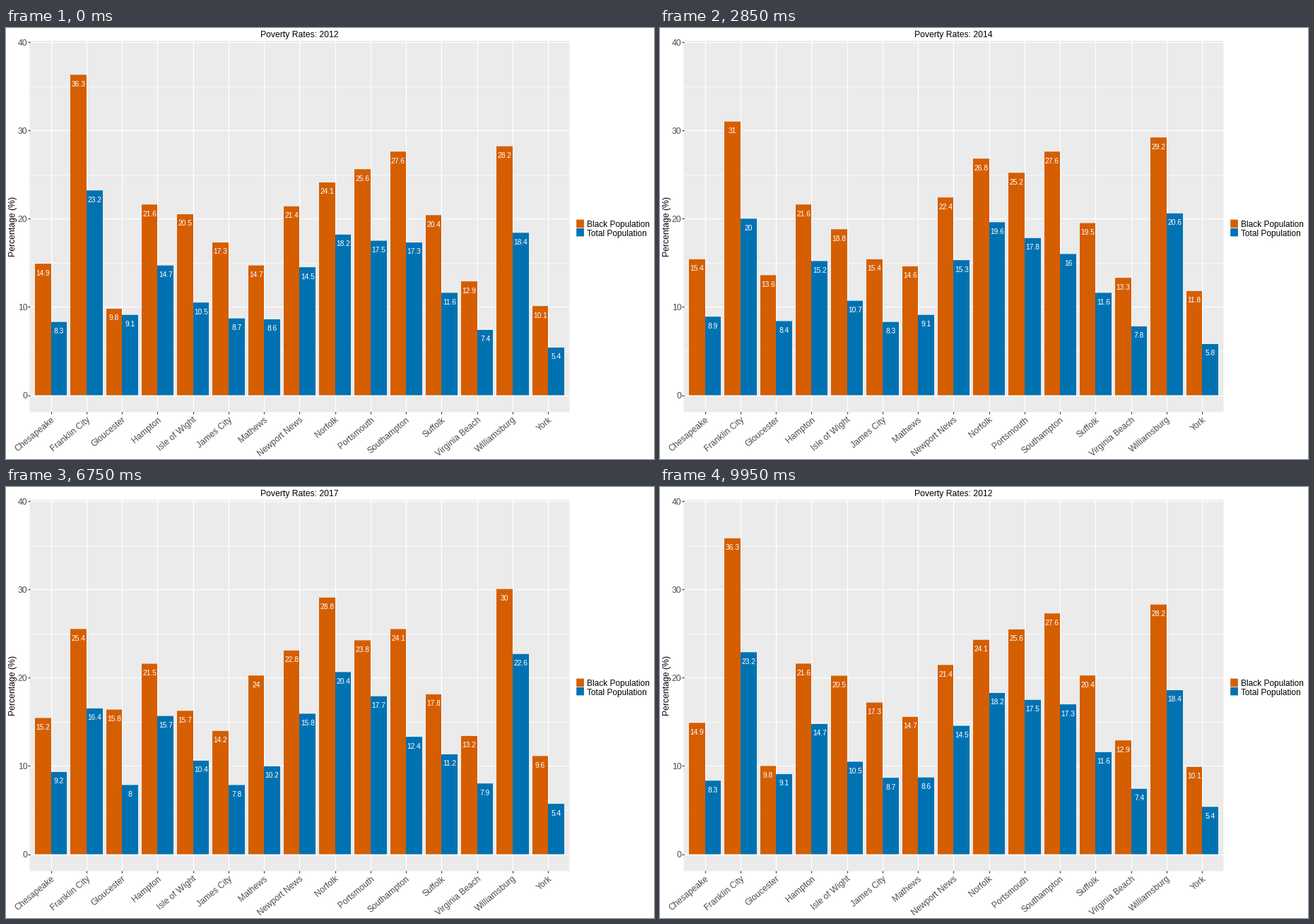
These frames come from a looping animation (917x611 px, 10 s). A matplotlib script:

```python
import numpy as np
import matplotlib.pyplot as plt
from matplotlib.animation import FuncAnimation
from matplotlib.patches import Rectangle

plt.rcParams["font.family"] = "Liberation Sans"

W, H, DPI = 917, 611, 72          # at 72 dpi one point is one pixel
FRAMES, INTERVAL = 200, 50
LEFT, RIGHT, TOP, BOTTOM = 33.5, 797.4, 18, 544.5
ZERO, UNIT = 520.6, 12.515        # y of 0 %, pixels per percent
STEP = (RIGHT - LEFT) / 15.2
BAR = 0.45 * STEP
ORANGE, BLUE = "#D55E00", "#0072B2"

# Black and total rates in the key years; the years between are interpolated
YEARS, KEY_YEARS = range(2012, 2019), (2012, 2016, 2018)
PLACES = {
    "Chesapeake": [(14.9, 15.8, 14.6), (8.3, 9.5, 9)],
    "Franklin City": [(36.3, 25.7, 25), (23.2, 16.7, 16.2)],
    "Gloucester": [(9.8, 17.3, 14.2), (9.1, 7.6, 8.5)],
    "Hampton": [(21.6, 21.7, 21.4), (14.7, 15.6, 15.8)],
    "Isle of Wight": [(20.5, 17.1, 14.3), (10.5, 10.9, 10)],
    "James City": [(17.3, 13.6, 14.7), (8.7, 7.9, 7.8)],
    "Mathews": [(14.7, 14.4, 33.6), (8.6, 9.6, 10.8)],
    "Newport News": [(21.4, 23.5, 22.2), (14.5, 16.1, 15.5)],
    "Norfolk": [(24.1, 29.5, 28.2), (18.2, 21, 19.7)],
    "Portsmouth": [(25.6, 24.9, 22.7), (17.5, 18.2, 17.2)],
    "Southampton": [(27.6, 27.7, 20.5), (17.3, 14.7, 10.2)],
    "Suffolk": [(20.4, 18.6, 17), (11.6, 11.5, 10.8)],
    "Virginia Beach": [(12.9, 13.7, 12.8), (7.4, 8.2, 7.6)],
    "Williamsburg": [(28.2, 30.1, 30), (18.4, 22.8, 22.4)],
    "York": [(10.1, 13.5, 5.6), (5.4, 6.2, 4.7)],
}
RATES = np.array([[np.interp(YEARS, KEY_YEARS, keys) for keys in pair]
                  for pair in PLACES.values()]).round(1)

MOVE = 23                         # frames of a move; the last two take one less

fig = plt.figure(figsize=((W + 1e-6) / DPI, (H + 1e-6) / DPI), dpi=DPI,
                 facecolor="white")
ax = fig.add_axes([0, 0, 1, 1])
ax.set_xlim(0, W)
ax.set_ylim(H, 0)
ax.axis("off")


def box(x, y, w, h, color, z=1):
    return ax.add_patch(Rectangle((x, y), w, h, fc=color, lw=0, zorder=z,
                                  snap=False))


def line(xs, ys, color, width):
    ax.plot(xs, ys, color=color, lw=width, zorder=2, solid_capstyle="butt")


def write(x, y, text, size=12.2, color="black", ha="center", angle=0):
    return ax.text(x, y, text, fontsize=size, color=color, ha=ha,
                   va="baseline", rotation=angle, rotation_mode="anchor",
                   zorder=5)


def center(i):
    return LEFT + (0.6 + i) * STEP


def level(rate):
    return ZERO - UNIT * rate


def draw_axes():
    box(LEFT, TOP, RIGHT - LEFT, BOTTOM - TOP, "#EBEBEB")
    for rate in range(5, 40, 10):
        line([LEFT, RIGHT], [level(rate)] * 2, "white", 0.7)
    for rate in range(0, 41, 10):
        y = level(rate)
        line([LEFT, RIGHT], [y, y], "white", 1.3)
        line([LEFT - 2.8, LEFT], [y, y], "#333333", 1.2)
        write(30.5, y + 4.6, str(rate), color="#4D4D4D", ha="right")
    tilt = np.radians(40)
    for i, place in enumerate(PLACES):
        x = center(i)
        line([x, x], [TOP, BOTTOM], "white", 1.3)
        line([x, x], [BOTTOM, BOTTOM + 2.8], "#333333", 1.2)
        write(x + 8.8 * np.sin(tilt), 549.5 + 8.8 * np.cos(tilt), place,
              color="#4D4D4D", ha="right", angle=40)
    write(13, 281.7, "Percentage (%)", angle=90)


def draw_legend():
    rows = [("Black Population", ORANGE), ("Total Population", BLUE)]
    for i, (name, color) in enumerate(rows):
        box(807.2, 271.6 + 12.3 * i, 10.7, 11.5, color)
        write(821.5, 282.3 + 12.2 * i, name, size=11.9, ha="left")


def draw_bars():
    bars, labels = [], []
    for i in range(len(PLACES)):
        for side, color in enumerate([ORANGE, BLUE]):
            x = center(i) + (side - 1) * BAR
            left, right = round(x), round(x + BAR)
            bars.append(box(left, ZERO, right - left, 0, color, z=3))
            labels.append(write(x + BAR / 2, ZERO, "", size=10.3,
                                color="white"))
    return bars, labels


def phase(frame):
    """Index of the year on show and progress towards the next one."""
    year = 0
    while True:
        start = 5 + 29 * year - (year == 6)
        length = MOVE - (year >= 5)
        if frame < start + length:
            return year, max(0, (frame - start) / length)
        year += 1


draw_axes()
draw_legend()
bars, labels = draw_bars()
title = write((LEFT + RIGHT) / 2, 13.2, "")


def update(frame):
    now, t = phase(frame)
    after = (now + 1) % len(YEARS)
    shown = now if t < 0.5 else after
    rates = (1 - t) * RATES[..., now] + t * RATES[..., after]
    title.set_text(f"Poverty Rates: {YEARS[shown]}")
    for bar, label, rate, value in zip(bars, labels, rates.flat,
                                       RATES[..., shown].flat):
        y = level(rate)
        bar.set_y(y)
        bar.set_height(ZERO - y)
        label.set_y(y + 16.4)
        label.set_text(f"{value:g}")
    return [title, *bars, *labels]


anim = FuncAnimation(fig, update, frames=FRAMES, interval=INTERVAL,
                     init_func=lambda: update(0), repeat=True,
                     repeat_delay=0, blit=False)
plt.show()
```
